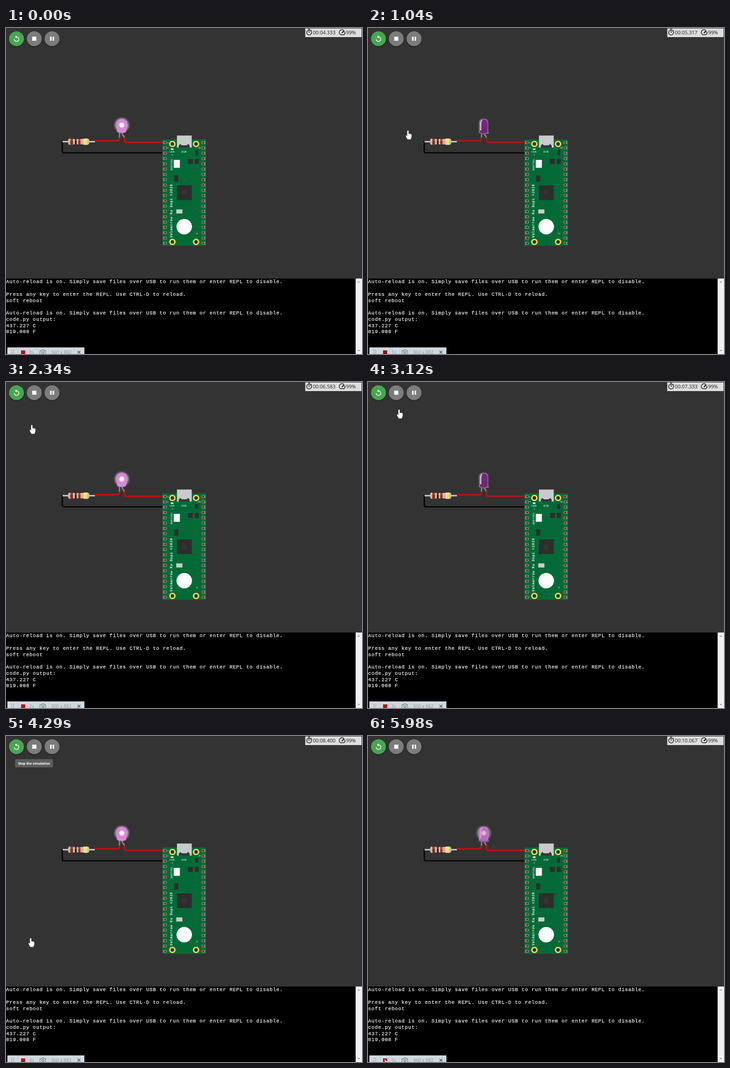
Write an HTML page that moves like this. It is 781x717 px and loops after 6.11 s.

```html
<!DOCTYPE html>
<html lang="en">
<head>
<meta charset="utf-8">
<title>Blinking LED simulation</title>
<style>
html, body { margin: 0; width: 100%; height: 100%; overflow: hidden; background: #333; }
svg { display: block; }
text { white-space: pre; }
.ui { font-family: "Open Sans", "Noto Sans", sans-serif; }
.term {
  font: 11px "Liberation Mono", "Courier New", monospace;
  letter-spacing: .715px; fill: #f4f4f4; stroke: #f4f4f4; stroke-width: .25px;
}
.silk { font-family: "DejaVu Sans Mono", monospace; font-weight: bold; fill: #eef5ee; }
</style>
</head>
<body>
<svg width="781" height="717" viewBox="0 0 781 717">
  <defs>
    <radialGradient id="halo">
      <stop offset=".5" stop-color="#f3d3f6" stop-opacity=".9"/>
      <stop offset=".7" stop-color="#e3bfea" stop-opacity=".6"/>
      <stop offset=".85" stop-color="#b79bc0" stop-opacity=".3"/>
      <stop offset="1" stop-color="#88788f" stop-opacity="0"/>
    </radialGradient>
    <radialGradient id="core">
      <stop offset=".4" stop-color="#fff"/>
      <stop offset=".65" stop-color="#f6d4f6"/>
      <stop offset="1" stop-color="#e08fe2" stop-opacity="0"/>
    </radialGradient>
    <filter id="soft" x="-30%" y="-30%" width="160%" height="170%">
      <feDropShadow dx="0" dy="1.5" stdDeviation="1.5" flood-opacity=".4"/>
    </filter>
  </defs>

  <rect width="781" height="717" fill="#333"/>
  <path d="M0 .5H781M.5 0V551" stroke="#292929"/>

  <g filter="url(#soft)">
    <circle cx="23" cy="23.5" r="16.3" fill="#46a650"/>
    <circle cx="62" cy="23.5" r="16.3" fill="#7b7b7b"/>
    <circle cx="101" cy="23.5" r="16.3" fill="#7b7b7b"/>
  </g>
  <path d="M23 19.6a5 5 0 1 1-5 5" fill="none" stroke="#fff" stroke-width="1.5"/>
  <path d="M23.4 16.3v6.6L19.8 19.6z" fill="#fff"/>
  <path d="M57.5 19h9v9h-9zM96.8 19h3.2v9h-3.2zM102.3 19h3.2v9h-3.2z" fill="#fff"/>

  <rect x="656.5" y="1" width="123.5" height="19" fill="#dedede"/>
  <g fill="none" stroke="#161616" stroke-width="1.5">
    <circle cx="665" cy="10" r="5.3"/>
    <path d="M662.8 2.4h4.4M665 6.5v4M669.4 4.6l1.2 1.2"/>
    <path d="M733.5 14.7a6 6 0 1 1 7.4-9.7M743 7.7a6 6 0 0 1-1.4 7H733.5"/>
    <path d="M737 11.3l4.8-5.6" stroke-width="2.4"/>
  </g>
  <g class="ui" font-size="11" fill="#1c1c1c">
    <text id="clock" x="673" y="14"></text>
    <text x="746" y="14">99%</text>
  </g>

  <path d="M123.5 248V270.5Q123.5 274.5 127.5 274.5H346" fill="none" stroke="#090909" stroke-width="3.2"/>
  <path d="M124 250H195" stroke="#cfcfca" stroke-width="3"/>
  <path d="M140 243Q136 243 136 250T140 257Q146 257.5 149 256H169Q173 257.5 179 257Q183 256.5 183 250T179 243Q173 242.5 169 244H149Q146 242.5 140 243z" fill="#c9bc9f"/>
  <path d="M141 243h6v14h-6z" fill="#873220"/>
  <path d="M151.3 244h3.5v12h-3.5z" fill="#151515"/>
  <path d="M158.5 244h5v12h-5z" fill="#c81818"/>
  <path d="M170 243.3q4-.8 8 0v13.4q-4 .8-8 0z" fill="#ecdf7c"/>
  <path d="M138 246.5h43" stroke="#fff" stroke-width="2" opacity=".23"/>
  <path id="wire" d="M195 248H245.5Q248.5 248 248.5 245V240M260 240V247.5Q260 251.5 264 251.5H346" fill="none" stroke-width="3.4"/>

  <path d="M249 229V241M255 229V233Q255 235 257 236Q259 237 259 241" fill="none" stroke="#8d858d" stroke-width="2.8"/>
  <g id="ledOff">
    <path d="M243 231V209Q243 199 253.5 199T264 209V228L265.5 230V232Q254 236 243 231z" fill="#86648a"/>
    <path d="M246 230V210Q246 201.5 253.5 201.5T262 210V229Q254 234 246 230z" fill="#75247d"/>
    <path d="M247.3 225V210Q247.3 204.5 250.5 203" fill="none" stroke="#d3bbd6" stroke-width="2.8"/>
  </g>
  <g id="ledOn">
    <circle cx="254" cy="213.5" r="19" fill="url(#halo)"/>
    <path d="M244 229Q241.5 215 243 208Q245 200 254 200T265 208Q266.5 216 263 229Q254 233 244 229z" fill="#d987da"/>
    <circle cx="254" cy="213.5" r="7.5" fill="url(#core)"/>
  </g>

  <g id="board">
    <rect x="343" y="245" width="96" height="234" fill="#036a37"/>
    <g id="pins"></g>
    <path d="M375 236.5h32.5V263H375z" fill="#c9cacb"/>
    <path d="M379 263v-4l3-4 4 3h10l4-3 3 4v4z" fill="#373737"/>
    <path d="M361.5 265h6v3h-6z" fill="#f0f4ee"/>
    <path d="M399 288h11v11h-11zM414 288h9v11h-9zM415 268h6.5v11h-6.5zM369 324h9v14h-9z" fill="#2c2e2d"/>
    <path d="M368 290h13.5v17.5H368z" fill="#f8f8f8"/>
    <path d="M375 346h32.5v32.5H375z" fill="#2d2d2d"/>
    <circle cx="391" cy="362" r="6.5" fill="#343434"/>
    <path d="M373.5 399h13.5v9h-13.5z" fill="#c8cbc8"/>
    <circle cx="391" cy="437" r="17" fill="#fff"/>
    <circle cx="419" cy="452" r="2" fill="#7b8b68"/>
    <circle cx="365" cy="279" r="1.5" fill="#8a927c"/>
    <g class="silk">
      <text x="359" y="274" font-size="5" letter-spacing=".7">LED</text>
      <text x="385" y="274" font-size="5" letter-spacing=".9">USB</text>
      <text x="354" y="254" font-size="4">1</text>
      <text x="354" y="265" font-size="4">2</text>
      <text x="422" y="265" font-size="4">39</text>
      <text transform="translate(365 313) rotate(-90)" font-size="5" letter-spacing=".8">BOOTSEL</text>
      <text transform="translate(364.5 461) rotate(-90)" font-size="7.4" letter-spacing=".68">Velmarrow Ku Dopi ©2020</text>
    </g>
  </g>

  <rect y="551" width="767" height="166"/>
  <rect x="767" y="551" width="14" height="166" fill="#f1f1f1"/>
  <path d="M771 560h6l-3-3.5zM771 708h6l-3 3.5z" fill="#a5a5a5"/>
  <g id="terminal" class="term"></g>

  <rect x="3" y="702.5" width="169" height="14.5" fill="#cfdae0"/>
  <path d="M26.5 703v14M47.5 703v14M69.5 703v14M93.5 703v14M148.5 703v14" stroke="#c0cbd2"/>
  <path d="M13 708v9M17 708v9" stroke="#68747c" stroke-width="1.5" stroke-dasharray="1.5 2.5"/>
  <rect id="record" x="33" y="709" width="9" height="8"/>
  <path d="M74.5 717V710H77.5L79 708H83L84.5 710H87V717" fill="none" stroke="#70868a" stroke-width="1.3"/>
  <circle cx="81" cy="714" r="2.3" fill="none" stroke="#608477" stroke-width="1.3"/>
  <g class="ui" font-size="10" fill="#8b959c">
    <text id="seconds" x="51" y="717"></text>
    <text x="99" y="717">960 x 882</text>
  </g>
  <path d="M157 710l6 6M163 710l-6 6" stroke="#3d484f" stroke-width="1.3"/>

  <g id="tooltip">
    <rect x="20" y="51" width="83" height="18" rx="2.5" fill="#5d5d5d"/>
    <text x="61.5" y="62.6" text-anchor="middle" font-family="Roboto, sans-serif" font-weight="700" font-size="8.1" fill="#fff">Stop the simulation</text>
  </g>
  <path id="hand" d="M-3.5 2V-7.2q0-1.9 1.7-1.9t1.7 1.9V-2.6q5 .3 6 1.7V4q0 2-1.4 3.5V9.5H-2.5Q-5.8 5-6.5 2.2q0-2.2 3-.2z" fill="#fff" stroke="#222" stroke-width=".5"/>
  <path id="arrow" d="M36.5 709v9h9l-3-3h-2.5z" fill="#fff" stroke="#6c1515" stroke-width=".5"/>
</svg>
<script>
const LOOP = 6110, STEP = 130;
const $ = id => document.getElementById(id);

const TERMINAL = [
  "Auto-reload is on. Simply save files over USB to run them or enter REPL to disable.",
  "",
  "Press any key to enter the REPL. Use CTRL-D to reload.",
  "soft reboot",
  "",
  "Auto-reload is on. Simply save files over USB to run them or enter REPL to disable.",
  "code.py output:",
  "437.227 C",
  "819.008 F"
];
$("terminal").innerHTML = TERMINAL.map((line, i) =>
  `<text x="0.3" y="${561.3 + i * 13.75}">${line}</text>`).join("");

function pin(x, y, side) {
  return `<rect x="${x - 4.5}" y="${y - 3}" width="9" height="6" rx="1.5" fill="#8f8772"/>
    <circle cx="${x + side}" cy="${y}" r="2" fill="#35342f"/>
    <rect x="${x - 4.5 * side - 0.7}" y="${y - 1.5}" width="1.4" height="3" fill="#37332d"/>`;
}
const mount = (x, y) =>
  `<circle cx="${x}" cy="${y}" r="5.5" fill="#333" stroke="#ecdc55" stroke-width="3.2"/>`;

let parts = "";
for (let i = 0; i < 20; i++) {
  const y = 252 + i * 11.66;
  parts += pin(348.3, y, 1) + pin(433.7, y, -1);
}
for (const x of [365, 417]) parts += mount(x, 255) + mount(x, 470.5);
$("pins").innerHTML = parts;

// [ms, simulated seconds]
const CLOCK = [[0, 4.333], [1040, 5.317], [2340, 6.583], [3120, 7.333],
  [4290, 8.4], [5330, 9.434], [5980, 10.067]];
// [ms, x, y]
const POINTER = [[650, 48, 640], [780, 62, 470], [1040, 89.5, 235], [1560, 76, 158],
  [2340, 58.5, 104], [3120, 70, 70], [3510, 64, 30], [4030, 62, 32],
  [4290, 56, 454], [4550, 46, 660], [4680, 42, 705]];

function sample(table, t) {
  let i = 0;
  while (i < table.length - 2 && t >= table[i + 1][0]) i++;
  const a = table[i], b = table[i + 1];
  const k = (t - a[0]) / (b[0] - a[0]);
  return a.slice(1).map((v, j) => v + (b[j + 1] - v) * k);
}
const show = (id, visible) => $(id).setAttribute("visibility", visible ? "visible" : "hidden");

function draw(t) {
  const [sim] = sample(CLOCK, t);
  $("clock").textContent = "00:" + sim.toFixed(3).padStart(6, "0");
  $("seconds").textContent = Math.floor(t / 1000) + "s";

  const phase = sim - 0.05;
  const lit = Math.floor(phase) % 2 === 0;
  const level = lit ? Math.min(1, 0.65 + (phase % 1) * 3) : 0;
  $("ledOn").setAttribute("opacity", level);
  show("ledOff", level < 1);
  $("wire").setAttribute("stroke", lit ? "#c70e10" : "#b01415");
  $("record").setAttribute("fill", t >= 910 && t < 1300 ? "#9f0909" : "#c70a0d");

  const [x, y] = sample(POINTER, t);
  show("hand", t >= 650 && t < 4680);
  $("hand").setAttribute("transform", `translate(${x} ${y}) scale(1.07)`);
  show("arrow", t >= 4680);
  show("tooltip", t >= 3510 && t < 4420);
}

const start = performance.now();
let last = -1;
function tick() {
  const t = Math.floor(((performance.now() - start) % LOOP) / STEP) * STEP;
  if (t !== last) draw(last = t);
  requestAnimationFrame(tick);
}
tick();
</script>
</body>
</html>
```
